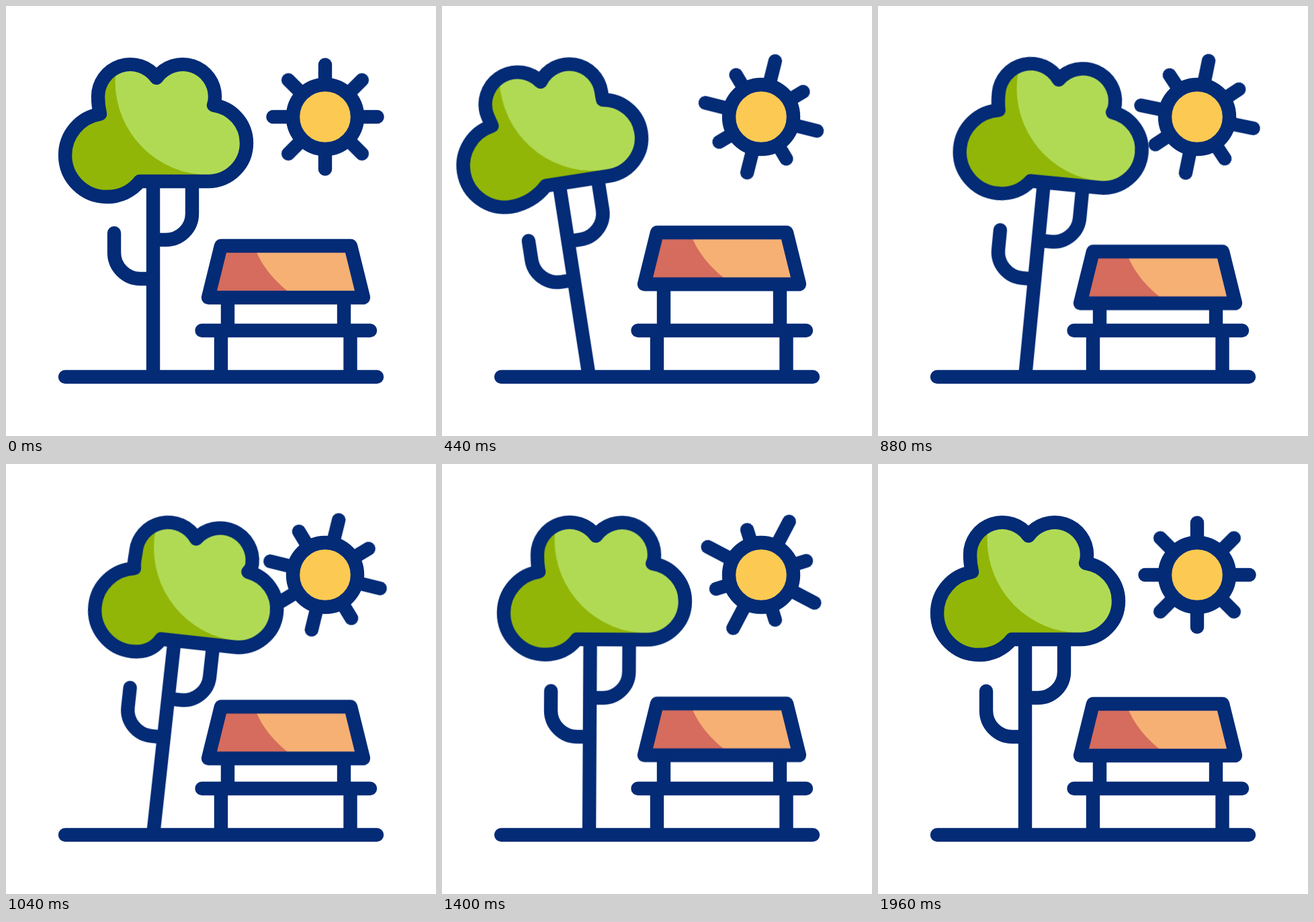
An HTML page for the animation above (2000 ms loop, 640 by 640 pixels).

```html
<!DOCTYPE html>
<html lang="en">
<head>
<meta charset="utf-8">
<title>Park with tree, bench and sun</title>
<style>
  html, body { margin: 0; width: 100%; height: 100%; overflow: hidden; background: #fff; }
  svg { display: block; width: 100%; height: 100%; }
  .line { fill: none; stroke: #032b76; stroke-width: 20.4; stroke-linejoin: round; }
  .round { stroke-linecap: round; }

  .tree, .cloud, .shine, .top, .rays, .ray {
    animation: 2s cubic-bezier(.33, 0, .67, 1) infinite;
  }
  .tree { transform-origin: 219px 552px; animation-name: sway; }
  .cloud { animation-name: lean; }
  .shine { animation-name: drift; }
  .top { animation-name: lift; }
  .rays { animation-name: spin; }
  .ray { animation-name: stretch; }
  .ray.short { animation-name: shrink; }

  @keyframes sway {
    0%, 73%, 100% { transform: rotate(0deg); }
    25% { transform: rotate(-9.2deg); }
    47%, 51% { transform: rotate(6.3deg); }
  }
  /* The crown trails behind the trunk while its base stays put. */
  @keyframes lean {
    0%, 4%, 77%, 100% {
      d: path("M199 261C187 276 169 284 150 284A62 62 0 0 1 88 222A62 62 0 0 1 140 160.8C138 152 137 144 137 136A48 48 0 0 1 224 107A48 48 0 0 1 311 136Q311 142 309 147.6A57 57 0 0 1 358 204A57 57 0 0 1 301 261Z");
    }
    30% {
      d: path("M199 261C183 276 160.5 284 141.5 284A62 62 0 0 1 79.5 222A62 62 0 0 1 131.5 160.8C129.5 152 125.5 144 125.5 136A48 48 0 0 1 212.5 107A48 48 0 0 1 299.5 136Q299.5 142 300.5 147.6A57 57 0 0 1 349.5 204A57 57 0 0 1 292.5 261Z");
    }
    55% {
      d: path("M199 261C191 276 177.5 284 158.5 284A62 62 0 0 1 96.5 222A62 62 0 0 1 148.5 160.8C146.5 152 148.5 144 148.5 136A48 48 0 0 1 235.5 107A48 48 0 0 1 322.5 136Q322.5 142 317.5 147.6A57 57 0 0 1 366.5 204A57 57 0 0 1 309.5 261Z");
    }
  }
  @keyframes drift {
    0%, 4%, 77%, 100% { transform: translateX(0); }
    30% { transform: translateX(-11px); }
    55% { transform: translateX(11px); }
  }
  @keyframes lift {
    0%, 72%, 100% { transform: translateY(0); }
    25% { transform: translateY(-20.7px); }
    47% { transform: translateY(10px); }
    60% { transform: translateY(-7.2px); }
  }
  @keyframes spin {
    0%, 98%, 100% { transform: rotate(0deg); }
    33% { transform: rotate(19deg); }
    48% { transform: rotate(10deg); }
    62%, 66% { transform: rotate(29deg); }
  }
  @keyframes stretch {
    0%, 10%, 84%, 100% { transform: translateY(0); }
    31% { transform: translateY(-13.3px); }
    50% { transform: translateY(-6px); }
    62%, 66% { transform: translateY(-13.9px); }
  }
  @keyframes shrink {
    0%, 10%, 84%, 100% { transform: translateY(0); }
    31% { transform: translateY(7.8px); }
    50% { transform: translateY(1.5px); }
    62%, 66% { transform: translateY(8.4px); }
  }
</style>
</head>
<body>
<svg viewBox="0 0 640 640">
  <defs>
    <clipPath id="crown"><path class="cloud"/></clipPath>
  </defs>

  <g transform="translate(475 165)">
    <g class="rays line round">
      <g><path class="ray" d="M0-40V-77.5"/></g>
      <g transform="rotate(45)"><path class="ray short" d="M0-40V-77.5"/></g>
      <g transform="rotate(90)"><path class="ray" d="M0-40V-77.5"/></g>
      <g transform="rotate(135)"><path class="ray short" d="M0-40V-77.5"/></g>
      <g transform="rotate(180)"><path class="ray" d="M0-40V-77.5"/></g>
      <g transform="rotate(225)"><path class="ray short" d="M0-40V-77.5"/></g>
      <g transform="rotate(270)"><path class="ray" d="M0-40V-77.5"/></g>
      <g transform="rotate(315)"><path class="ray short" d="M0-40V-77.5"/></g>
    </g>
    <circle class="line" r="48" style="fill:#fcca52"/>
  </g>

  <g class="tree">
    <path class="line" d="M219 261V552M277 261V309A39 39 0 0 1 238 348H219"/>
    <path class="line round" d="M161 338V367A39 39 0 0 0 200 406H219"/>
    <g clip-path="url(#crown)">
      <path class="cloud" fill="#91b608"/>
      <circle class="shine" cx="302" cy="112" r="139.5" fill="#b1da54"/>
    </g>
    <path class="cloud line"/>
  </g>

  <path class="line" d="M330 410V483M503 410V483M320 483V552M512.5 483V552"/>
  <path class="line round" d="M291.5 483H542M88 552H552"/>
  <g class="top">
    <path d="M320 357H513L532 434H301Z" fill="#d56c5d"/>
    <path d="M369 357C380 386 398 410 432 434H532L513 357Z" fill="#f6b074"/>
    <path class="line" d="M320 357H513L532 434H301Z"/>
  </g>
</svg>
</body>
</html>
```
